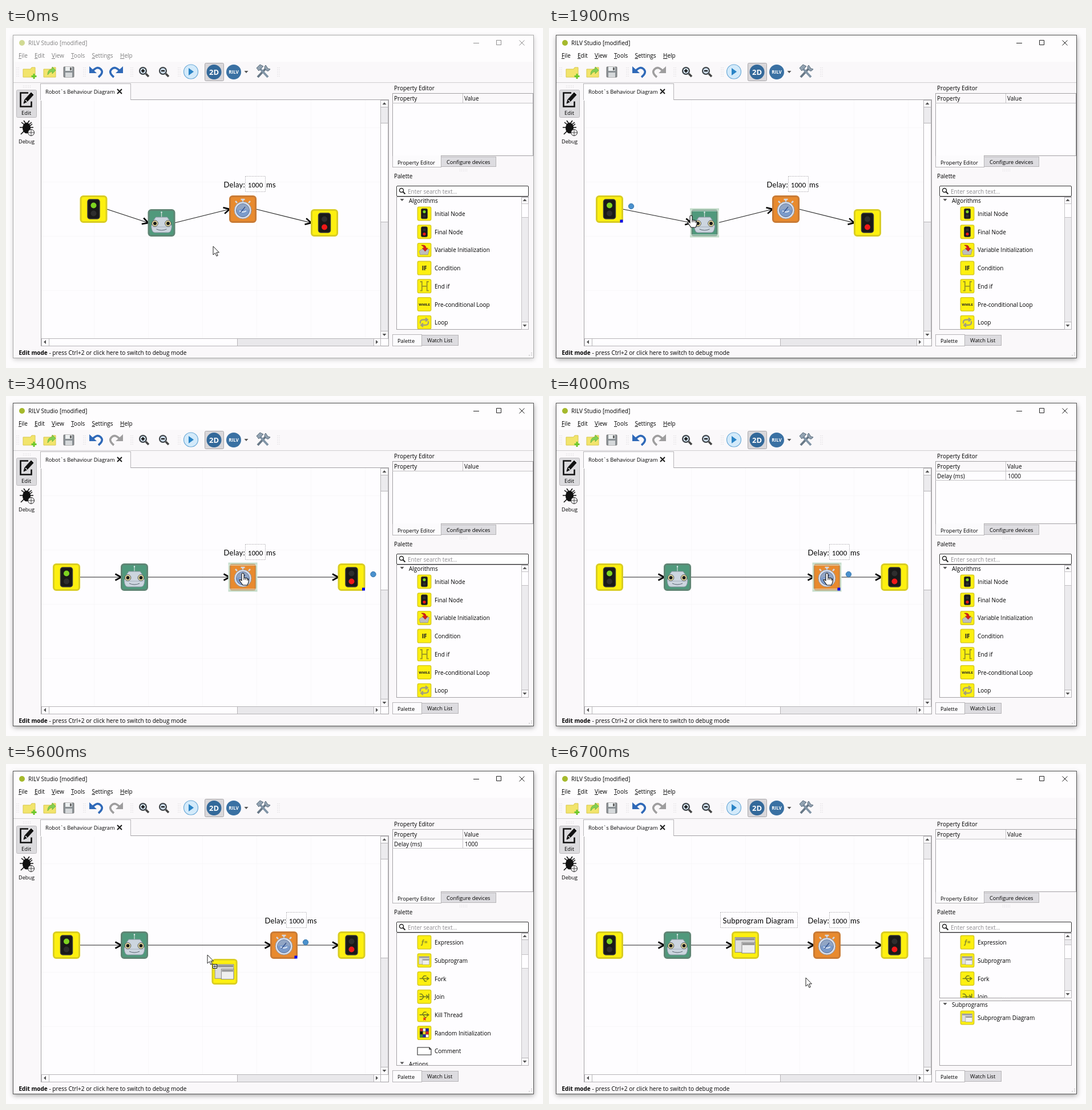
An HTML page that plays this animation: 941x595 px, repeating every 7700 ms.

```html
<!DOCTYPE html>
<html lang="en">
<head>
<meta charset="utf-8">
<title>Diagram editor</title>
<style>
  html, body { margin: 0; height: 100%; overflow: hidden; background: #fdfcfd; }
  svg { display: block; }
  text { font: 10px "Open Sans", sans-serif; fill: #000; white-space: pre; }
  .tab { font-size: 9.3px; }
  .bold { font-weight: bold; }
  .label { font: 13px Lato, sans-serif; letter-spacing: .25px; }
  .value { font: 11.3px Lato, sans-serif; }
  .glyph { font: 800 19px "Open Sans", sans-serif; fill: #3a3a20; text-anchor: middle; }
  .badge { font-weight: bold; fill: #fff; text-anchor: middle; }
  .inactive .chrome { opacity: .5; }
  .inactive #frame { stroke: #aaa; }
  .inactive #shadow { opacity: .55; }
</style>
</head>
<body>
<svg id="stage" width="941" height="595" viewBox="0 0 941 595"></svg>
<script>
const stage = document.getElementById('stage');
const rect = (x, y, w, h, fill, stroke = 'none', more = '') =>
  `<rect x="${x}" y="${y}" width="${w}" height="${h}" fill="${fill}" stroke="${stroke}" ${more}/>`;
const box = (x, y, w, h, fill, stroke = '#b7b5b8', more = '') => rect(x + .5, y + .5, w, h, fill, stroke, more);
const path = (d, stroke = '#222', width = 1, fill = 'none', more = '') =>
  `<path d="${d}" stroke="${stroke}" stroke-width="${width}" fill="${fill}" ${more}/>`;
const circle = (x, y, r, fill, stroke = 'none', width = 1) =>
  `<circle cx="${x}" cy="${y}" r="${r}" fill="${fill}" stroke="${stroke}" stroke-width="${width}"/>`;
const text = (x, y, s, kind = '', more = '') => `<text x="${x}" y="${y}" class="${kind}" ${more}>${s}</text>`;
const group = (id, inner, more = '') => `<g id="${id}" ${more}>${inner}</g>`;
const at = (x, y, inner, scale = 1) => `<g transform="translate(${x} ${y}) scale(${scale})">${inner}</g>`;
const dots = (x, y, vertical) =>
  path(vertical ? `M${x} ${y}v17m3-17v17` : `M${x} ${y}h15m-15 3h15`, '#d3d1d4', 1, 'none', 'stroke-dasharray="1 2"');
const triangle = (x, y, angle) => `<path d="M-3.5-2h7L0 2z" fill="#555" transform="translate(${x} ${y}) rotate(${angle})"/>`;

// Block pictures, drawn around their centre at 47 px
const tile = (inner, fill = '#fdf010', edge = '#d9cd22') =>
  rect(-22.5, -22.5, 45, 45, fill, edge, 'rx="4.5" stroke-width="3"') + inner;
const light = (top, bottom) => tile(rect(-10.5, -17, 21, 34, '#191919', '#3c3c3c', 'rx="4" stroke-width="1.5"') +
  circle(0, -6.5, 5, top) + circle(0, 7.5, 5, bottom));
const branch = path('M-16 0H14M8-5l7 5-7 5M-8 0l7-9H7M-4 0l6 9h6', '#77801c', 3);
const cells = ['#d22', '#fff', '#22a', '#111', '#e8d820', '#d22', '#2a8a3a', '#22a', '#fff'];
const art = {
  initial: light('#7ed321', '#2e2e2e'),
  final: light('#2e2e2e', '#f01818'),
  robot: tile(
    path('M0-10v-8', '#cfe0da', 1.2) + circle(0, -18.5, 1.2, '#e8eef2') +
    path('M-10-10H10l5 7 3 9q-1 11-6 11H-12q-5 0-6-11l3-9z', '#8793a0', 1, '#ccd5df') +
    path('M-16 7H16', '#a6b1bd') + path('M-9 11q9 4 18 0', '#59636f') +
    [-11.5, 11.5].map(x => circle(x, 1, 5.3, '#efe3a2', '#4c5058') + circle(x, 1, 3, '#1c1c1c')).join(''),
    '#50997c', '#5f8574'),
  delay: tile(
    path('M-3.5-17h7M0-17v5M10-11l3-3M-10-11l-3-3', '#d3d8e0', 2.5) +
    circle(0, 2, 15, '#dbe0ea', '#8e97a8') + circle(0, 2, 11.5, '#7b9bcb', '#5c7199') +
    path('M-11 2A11 11 0 0 1 11 2Q0-3-11 2z', 'none', 0, '#91a5c4') +
    path('M-6 3q6 4 12 0', '#dfe9f7', 2) + path('M-4 6L4-4', '#344f88', 1.3),
    '#e88a2e', '#c97b35'),
  sub: tile(
    rect(-18, -13.5, 35, 26, '#dedede', '#8a8a8a') + rect(-17, -12.5, 33, 4, '#929292') +
    rect(-6, -5, 23, 19, '#efefef', '#858585') + rect(-5, -4, 21, 4, '#999')),
  variable: tile(path('M-17 4L-9-2H17L12 16H-14z', '#777', 1, '#bdbdbd') +
    path('M-10-16Q6-18 6-6h6L3 5-7-6h6q0-5-9-10z', '#811', 1, '#d81b1b')),
  condition: tile(text(0, 7, 'IF', 'glyph')),
  endIf: tile(path('M-14-15h6V15h-6M-8 0H9M15-15H9V15h6', '#9a9622', 3.5)),
  whileLoop: tile(text(0, 4, 'WHILE', 'glyph', 'style="font-size:11.5px"')),
  loop: tile(path('M-13 4Q-16-9-3-9H9M4-15l7 6-7 6M13-4Q16 9 3 9H-9M-4 15l-7-6 7-6', '#a19f80', 4.5)),
  choice: tile(path('M-16 0H-4M-4-12V12M-4-12H14M-4 0H14M-4 12H14', '#77801c', 3)),
  formula: tile(text(0, 5, 'ƒ=', 'glyph', 'style="fill:#94952a;font-style:italic"')),
  fork: tile(branch),
  join: tile(path('M-16-9h7l8 9-8 9h-7M-16 0H12M6-6l7 6-7 6M15-10V10', '#77801c', 3)),
  kill: tile(branch + path('M-3 10l8 8m0-8l-8 8', '#d22', 3)),
  random: tile(cells.map((c, i) => rect(i % 3 * 10 - 15, (i / 3 | 0) * 10 - 15, 10, 10, c, '#444')).join('')),
  comment: path('M-23-12H17l6 6V13H-23zM17-12v6h6', '#222', 2, '#fff')
};

const palette = [
  ['initial', 'Initial Node'], ['final', 'Final Node'], ['variable', 'Variable Initialization'],
  ['condition', 'Condition'], ['endIf', 'End if'], ['whileLoop', 'Pre-conditional Loop'], ['loop', 'Loop'],
  ['choice', 'Switch'], ['formula', 'Expression'], ['sub', 'Subprogram'], ['fork', 'Fork'], ['join', 'Join'],
  ['kill', 'Kill Thread'], ['random', 'Random Initialization'], ['comment', 'Comment']
];
const entry = (y, icon, name) => at(733, y, art[icon], .52) + text(751, y + 4, name);
const heading = (y, name) => triangle(694, y - 1, 0) + text(706, y + 4, name);

const windowFrame = group('shadow', rect(13, 13, 912, 565, '#fff', 'none', 'filter="url(#blur)"')) +
  box(12, 12, 912, 565, '#faf8fa', '#555', 'id="frame"') + rect(13, 13, 911, 46, '#fefdfe') +
  group('', circle(28, 26, 5, '#a5b92c') + text(39, 30, 'RILV Studio [modified]') +
    path('M819 26.5h10M859.5 21.5h8v8h-8zM899.5 21.5l9 9m0-9l-9 9') +
    [[22, 'File'], [50, 'Edit'], [80, 'View'], [114, 'Tools'], [150.5, 'Settings'], [200, 'Help']].map(([x, s]) =>
      text(x, 52, `<tspan text-decoration="underline">${s[0]}</tspan>${s.slice(1)}`)).join(''), 'class="chrome"');

const folder = path('M-11-5h13l2-3h6v17h-21z', '#d8c84a', 1, '#f2e46c');
const undo = path('M-6-1Q2-10 8-4T4 10', '#2f69b8', 3.6) + path('M-12-9V3H1z', 'none', 0, '#2f69b8');
const lens = sign => path('M4 4l5 5', '#444', 3.5) + circle(-1, -1, 6, '#c3d2df', '#3a3f44', 2) + path(sign, '#111', 2);
const toolbar = rect(13, 59, 911, 36, '#faf8fa') + path('M13 95.5h911', '#cfcdd0') +
  [19, 136, 219, 302, 476].map(x => dots(x, 69, true)).join('') +
  at(41, 77, folder + path('M8 3v9M3.5 7.5h9', '#6cc82c', 3)) +
  at(77, 77, folder + path('M-4 5Q-4-5 4-5v-4l6 6-6 6V-1Q0-1-4 5z', '#5fae35', .7, '#84cf54')) +
  at(110, 77, rect(-9, -9, 18, 18, '#8a9094', '#777', 'rx="1"') + rect(-6, -9, 12, 7, '#eceff0') +
    rect(-6, 1, 12, 8, '#d5d8da') + rect(2, -8, 3, 5, '#666')) +
  at(158, 76, undo) + group('redo', at(193, 76, `<g transform="scale(-1 1)">${undo}</g>`)) +
  at(241, 76, lens('M-4-1h6m-3-3v6')) + at(276, 76, lens('M-4-1h6')) +
  circle(324, 76.5, 12.5, '#d3eafa', '#6aa9d8', 1.2) + path('M320 70l9 6.5-9 6.5z', 'none', 0, '#2a84c6') +
  box(348, 61, 33, 31, '#d9d7da', '#aaa8ab', 'rx="2"') + circle(364.5, 77, 13, '#33699a') +
  text(364.5, 81.5, '2D', 'badge', 'style="font-size:13px"') +
  circle(399, 77, 13, '#3a71a3') + text(399, 80, 'RILV', 'badge', 'style="font-size:8px"') + triangle(421, 77, 0) +
  at(450, 76, path('M-9 10L6-6', '#687887', 4) + path('M9 10L-6-6', '#8094a6', 4) +
    path('M-11-6l6-6 6 3-8 8z', '#5d6d7c', 1, '#91a2b1') + path('M5-11q-4 3 0 8t8-1l-4-1-2-3z', '#5d6d7c', 1, '#91a2b1'));

const sidebar = dots(30, 101) + box(18, 108, 35, 48, '#dcdbde', '#bcbabd', 'rx="2"') +
  path('M39 113.5H25.5v24h19v-9', '#111', 2.6) + path('M31 132l2-7 11-12 4 4-11 12z', '#111', 1, '#111') + path('M34 126l3 3', '#fff', 1.2) +
  text(27, 152, 'Edit', '', 'style="font-size:9.6px"') +
  path('M27 165l5 4m13-4l-5 4M24 174h24M26 186l6-6m14-12l-5 4M31 162l3 4m7-4l-3 4', '#111', 1.6) +
  '<ellipse cx="36" cy="175" rx="7" ry="9.5" fill="#111"/>' +
  circle(44, 183, 5.5, '#faf8fa', '#222') + path('M38.5 183h11M44 177.5v11', '#222', .8) +
  text(22, 202, 'Debug', '', 'style="font-size:9.2px"');

const canvas = box(61, 125, 609, 431, '#fefdff', '#a3a1a4') + rect(62, 126, 594, 417, 'url(#grid)') +
  box(60, 97, 158, 28, '#fefdff') + rect(61, 124, 157, 3, '#fefdff') +
  text(69, 115, 'Robot`s Behaviour Diagram', 'tab') + path('M195 107l8 8m0-8l-8 8', '#111', 1.8) +
  box(656, 126, 13, 417, '#ecebee') + box(656, 126, 13, 12, '#fcfbfd') + triangle(663, 132, 180) +
  box(656, 166, 13, 173, '#fefdff') + box(656, 530, 13, 13, '#fcfbfd') + triangle(663, 537, 0) +
  box(62, 543, 594, 13, '#e9e8eb') + box(62, 543, 13, 13, '#fcfbfd') + triangle(68, 549.5, 90) +
  box(75, 543, 330, 13, '#fefdff') + box(644, 543, 12, 13, '#fcfbfd') + triangle(650, 549.5, -90);

const docks = text(680, 109, 'Property Editor') + box(677, 114, 246, 109, '#fefdff', '#a3a1a4') +
  rect(678, 115, 245, 16, '#faf8fa') + path('M677 131.5h246M800.5 115v16', '#c4c2c5') +
  text(680, 127, 'Property') + text(803, 127, 'Value') +
  group('property', path('M677 147.5h246M800.5 131v16', '#c4c2c5') + text(680, 144, 'Delay (ms)') + text(804, 144, '1000')) +
  box(762, 225, 96, 17, '#dddce0') + box(677, 224, 85, 19, '#fcfbfd') + rect(678, 223, 84, 3, '#fcfbfd') +
  text(686, 238.5, 'Property Editor', 'tab') + text(772, 238, 'Configure devices', 'tab') +
  dots(795, 247) + text(680, 263, 'Palette') +
  box(684, 295, 231, 232, '#fefdff', '#a3a1a4', 'id="listBox"') +
  `<svg id="list" x="686" y="296" width="217">` +
  group('items', heading(302, 'Algorithms') + palette.map((p, i) => entry(325 + i * 31.7, ...p)).join('') + heading(791, 'Actions')) + '</svg>' +
  box(903, 296, 12, 231, '#ecebee', '#c4c2c5', 'id="listTrough"') + box(903, 296, 12, 11, '#fcfbfd') + triangle(909, 301, 180) +
  box(903, 307, 12, 24, '#fefdff', '#c4c2c5', 'id="listThumb"') +
  group('listDown', box(903, 514, 12, 13, '#fcfbfd') + triangle(909, 521, 0)) +
  box(684, 276, 231, 18, '#fff', '#333', 'rx="1.5"') + circle(693, 284, 3.5, 'none', '#222', 1.5) + path('M695.5 286.5l4 4', '#222', 2) +
  text(704, 290, 'Enter search text...', '', 'style="fill:#8d8b90"') +
  group('subprograms', dots(795, 410) + box(684, 414, 231, 113, '#fefdff', '#a3a1a4') + heading(421, 'Subprograms') + entry(444, 'sub', 'Subprogram Diagram')) +
  box(728, 537, 64, 18, '#dddce0') + box(677, 536, 51, 20, '#fcfbfd') +
  text(686, 551, 'Palette', 'tab') + text(738, 550, 'Watch List', 'tab') +
  text(22.5, 572, 'Edit mode', 'bold') + text(75.5, 572, '- press Ctrl+2 or click here to switch to debug mode', '', 'style="font-size:10.1px"') +
  path('M921 568v7M917 572v3', '#bbb', 1.5, 'none', 'stroke-dasharray="1.5 2"');

const dotted = (x, w) => box(x, -58, w, 27, 'none', '#99979b', 'stroke-dasharray="1 1.5"');
const labels = {
  delay: text(-33.5, -38, 'Delay:', 'label') + dotted(4, 35) + text(9, -38, '1000', 'value') + text(41, -38, 'ms', 'label'),
  sub: group('subLabel', dotted(-44, 135) + text(-39.5, -38, 'Subprogram Diagram', 'label'))
};
const blocks = ['initial', 'robot', 'delay', 'final', 'sub'];
const scene = [0, 1, 2, 3].map(i => `<path id="link${i}" fill="none" stroke="#222" stroke-width="1.2" marker-end="url(#tip)"/>`).join('') +
  blocks.map(b => group(b, art[b] + (labels[b] || ''))).join('') +
  group('hover', rect(-24, -24, 48, 48, 'none', '#bcd9c4', 'stroke-width="3" opacity=".85"') + rect(-25, -21, 50, 42, 'none', '#e6f2e8')) +
  group('selection', rect(18.5, 18.5, 5, 5, '#0000e8') + circle(38, -5, 4.7, '#4a90cd', '#3977ac')) +
  group('ghost', at(30, 29.5, art.sub, .94) + box(9, 16, 7, 7, '#fff', '#111') + path('M13 17.5v5M10.5 20h5', '#111'));
const pointers =
  group('arrow', path('M0 0V15l3.5-3.3 2.4 5.5 2.3-1-2.4-5.4h4.6z', '#222', 1, '#fff')) +
  group('finger', path('M-2 1q0-2 1.8-2T2 1v6q5 0 7 2t1 6l-2 5H0l-5-7q-2-3 0-3l3 2z', '#111', 1.1, '#fff') + path('M2 7v4M5 8v3M8 9v3', '#111')) +
  group('palm', path('M-6 15l-2-6q0-3 3 0V-1q0-2 3 0v-4q1-3 3 0 2-2 3 1v2q3-1 3 2v9l-3 7h-7z', '#111', 1.1, '#fff') + path('M-2-1v7M1-4V6M4-3v9', '#111'));

stage.innerHTML = `<defs>
  <filter id="blur" x="-5%" y="-5%" width="110%" height="110%"><feDropShadow dx="0" dy="2" stdDeviation="4" flood-opacity=".38"/></filter>
  <pattern id="grid" x="154" y="269" width="95" height="95" patternUnits="userSpaceOnUse"><path d="M0 .5h95M.5 0v95" stroke="#f8f7f9"/></pattern>
  <marker id="tip" markerUnits="userSpaceOnUse" orient="auto" markerWidth="16" markerHeight="16" refX="12" refY="8">
    <path d="M1.5 2.5L12 8 1.5 13.5" fill="none" stroke="#000" stroke-width="2.6"/></marker></defs>` +
  windowFrame + toolbar + sidebar + canvas + docks + scene + pointers;

const $ = id => document.getElementById(id);
const show = (id, on) => $(id).setAttribute('display', on ? 'inline' : 'none');
const place = (id, [x, y]) => $(id).setAttribute('transform', `translate(${x} ${y})`);
const ramp = (t, a, b) => {
  const k = Math.min(1, Math.max(0, (t - a) / (b - a)));
  return k * k * (3 - 2 * k);
};
const move = (t, a, b, [x, y], [u, v]) => {
  const k = ramp(t, a, b);
  return [x + (u - x) * k, y + (v - y) * k];
};
const track = [
  [1000, 363, 382], [1300, 150, 318], [1400, 150, 318], [1700, 102.5, 318], [1900, 249, 329], [2000, 249, 329],
  [2400, 201.5, 305], [2500, 201.5, 305], [2800, 556, 335], [2900, 556, 335], [3200, 603.5, 311],
  [3400, 415, 311], [3600, 415, 311], [4000, 487, 311], [4100, 487, 311], [4400, 736, 340], [5200, 736, 340],
  [5600, 353, 334], [5800, 344, 317], [6200, 344, 317], [6600, 450, 374]
];
const cursorAt = t => {
  const i = track.findIndex(k => k[0] > t);
  if (i < 0) return track.at(-1).slice(1);
  if (i === 0) return track[0].slice(1);
  const [a, ...from] = track[i - 1], [b, ...to] = track[i];
  return move(t, a, b, from, to);
};

function render(t) {
  const dropped = t >= 5900, named = t >= 6400;
  const pos = {
    initial: move(t, 1400, 1700, [153.5, 317], [106, 317]),
    robot: move(t, 2000, 2400, [272.5, 341], [225, 317]),
    delay: move(t, 3600, 4000, [415, 317], [487, 317]),
    final: move(t, 2900, 3200, [558, 341], [605.5, 317]),
    sub: [344, 317]
  };
  blocks.forEach(b => place(b, pos[b]));
  show('sub', dropped);
  show('subLabel', named);

  const chain = dropped ? ['initial', 'robot', 'sub', 'delay', 'final'] : blocks.slice(0, 4);
  for (let i = 0; i < 4; i++) {
    const [a, b] = [pos[chain[i]], pos[chain[i + 1]]];
    show('link' + i, b);
    if (b) $('link' + i).setAttribute('d', `M${a[0] + 23} ${a[1]}L${b[0] - 23} ${b[1]}`);
  }

  const selected = t < 1400 || dropped ? null : t < 2000 ? 'initial' : t < 2900 ? 'robot' : t < 3600 ? 'final' : 'delay';
  show('selection', selected);
  if (selected) place('selection', pos[selected]);
  show('property', selected === 'delay');

  const cursor = cursorAt(t);
  const hovered = t >= 1000 && t < 4200 && blocks.slice(0, 4).find(b =>
    Math.abs(cursor[0] - pos[b][0]) < 24 && Math.abs(cursor[1] - pos[b][1]) < 24);
  show('hover', hovered);
  if (hovered) place('hover', pos[hovered]);
  const pointer = hovered ? 'finger' : t >= 4400 && t < 5200 ? 'palm' : 'arrow';
  for (const p of ['arrow', 'finger', 'palm']) show(p, p === pointer);
  place(pointer, cursor);
  show('ghost', t >= 5200 && !dropped);
  place('ghost', cursor);

  const scroll = ramp(t, 4200, 4600), height = named ? 114 : 232;
  place('items', [0, -266.5 * scroll]);
  $('list').setAttribute('height', height - 1);
  $('list').setAttribute('viewBox', `686 296 217 ${height - 1}`);
  $('listBox').setAttribute('height', height);
  $('listTrough').setAttribute('height', height - 1);
  $('listThumb').setAttribute('y', named ? 316.5 : 307.5 + 26 * scroll);
  place('listDown', [0, height - 232]);
  show('subprograms', named);

  $('redo').style.cssText = t >= 1700 ? 'filter:grayscale(1);opacity:.6' : '';
  stage.classList.toggle('inactive', t < 1000 || (t >= 6000 && t < 6400));
}

function tick() {
  render(Math.floor(performance.now() % 7700 / 100) * 100);
  requestAnimationFrame(tick);
}
tick();
</script>
</body>
</html>
```
